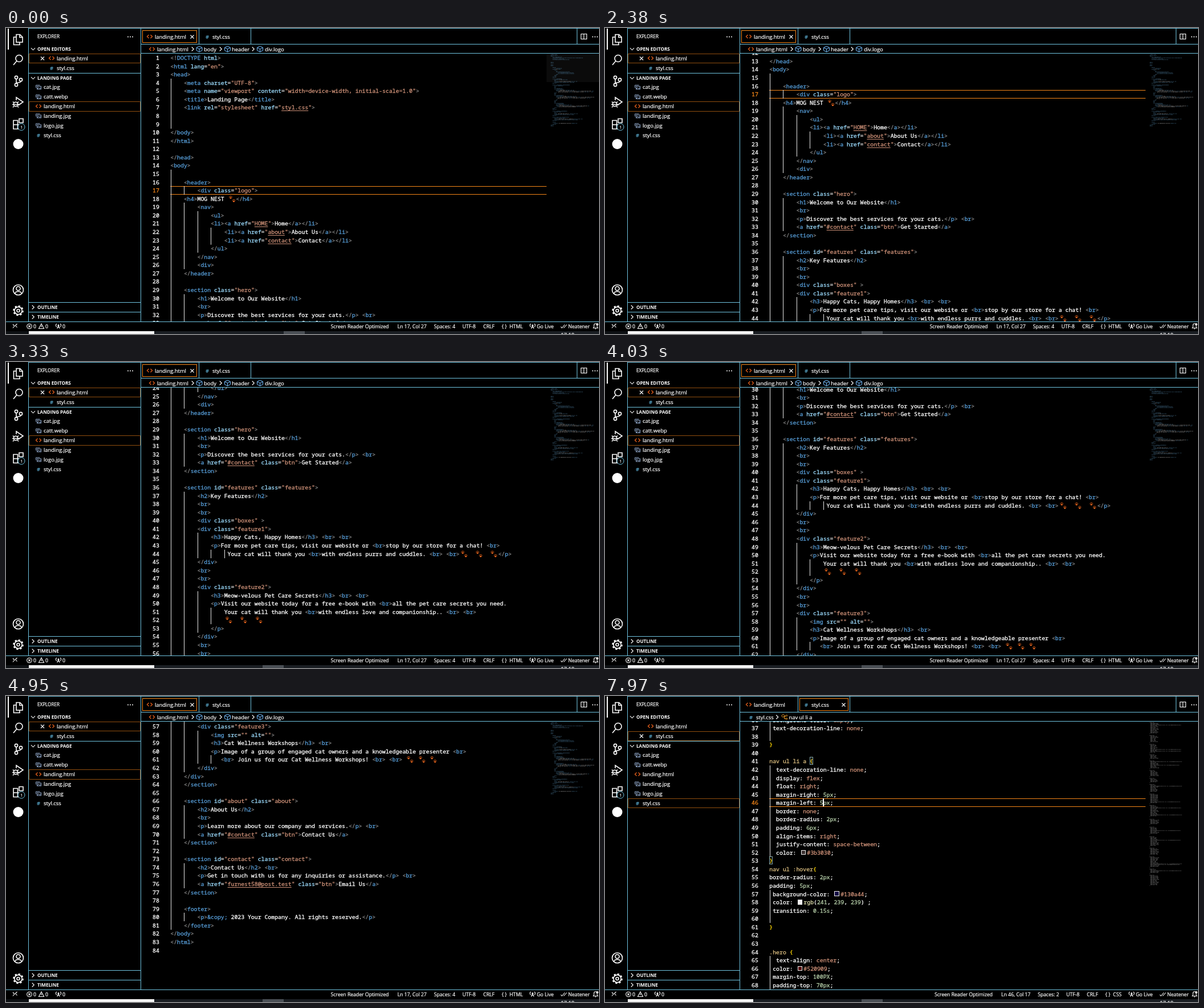
Write an HTML page with a canvas that moves like this. It is 1040 px wide and 538 px high and loops after 8 s.

```html
<!DOCTYPE html>
<html lang="en">
<head>
<meta charset="utf-8">
<title>Code editor</title>
<style>
html, body { margin: 0; width: 100%; height: 100%; overflow: hidden; background: #000; }
#stage { position: absolute; left: 0; top: 0; width: 1040px; height: 538px; overflow: hidden; background: #000; color: #fff; }
#stage > svg { position: absolute; left: 0; top: 0; }
text { font: 9.4px "Open Sans", "Noto Sans", sans-serif; fill: #fff; stroke: #fff; stroke-width: .22; white-space: pre; }
.cap { font-size: 8.1px; }
.head { font-size: 8.1px; font-weight: 700; stroke: none; }
.status text { font-size: 8.65px; }
.badge { font-size: 7px; }
.ico { fill: none; stroke: #fff; stroke-width: 1.1; }
.big { stroke-width: 1.6; }
.rule { fill: none; stroke: #6fc3df; stroke-width: 1; }
.focus { fill: none; stroke: #f38518; stroke-width: 1; }
.dim { stroke: #8f4d0e; }
.hash { fill: #519aba; stroke: none; font-weight: 700; }
.css-on, .hover-on { display: none; }
.css .css-on, .hover .hover-on { display: inline; }
.css .html-on { display: none; }

#editor { position: absolute; left: 237px; top: 45px; width: 711px; height: 471px; overflow: hidden;
  font: 9.84px/14.57px "Noto Sans Mono", "DejaVu Sans Mono", monospace; white-space: pre; -webkit-text-stroke: .32px currentColor; }
.pane { position: absolute; left: 0; top: 0; width: 711px; }
.row { position: absolute; left: 0; width: 711px; height: 14.57px; }
.row i { font-style: normal; }
.num { position: absolute; left: 0; width: 31.8px; text-align: right; }
.code { position: absolute; left: 51.3px; }
.guide { position: absolute; top: 0; width: 1px; height: 15px; background: #e8e8e8; }
.current::before { content: ""; position: absolute; left: 51px; right: 0; top: 0; height: 13px; border: solid #f38518; border-width: 1px 0; }
.current .num { color: #f38518; }
.pun { color: #808080; }
.tag { color: #569cd6; }
.att { color: #9cdcfe; }
.str { color: #ce9178; }
.link { text-decoration: underline; text-underline-offset: 2px; }
.sel { color: #d7ba7d; }
.brace { color: #ffd700; }
.match { outline: 1px solid #8aa; outline-offset: -1px; }
.val { color: #ce9178; }
.unit { color: #b5cea8; }
.fn { color: #dcdcaa; }
.chip { display: inline-block; box-sizing: border-box; width: 8.6px; height: 8.6px; margin: 0 2.15px; border: 1px solid #eee; vertical-align: -0.5px; }
.paw { width: 14.7px; height: 13px; vertical-align: -3px; }
#caret { position: absolute; left: 145px; width: 2px; height: 14px; background: #fff; }
canvas { position: absolute; left: 948px; top: 45px; }
#slider { position: absolute; left: 948px; width: 92px; height: 50px; background: rgba(255, 255, 255, .045); }
</style>
</head>
<body>
<div id="stage">
<svg width="1040" height="538" viewBox="0 0 1040 538">
  <defs>
    <path id="angle" d="M-1.5-3-4.5 0-1.5 3M1.5-3 4.5 0 1.5 3" fill="none" stroke="#e8601c" stroke-width="1.3"/>
    <path id="close" class="ico" d="M-3-3 3 3M3-3-3 3"/>
    <path id="down" class="ico" d="M-3.5-1.8 0 1.8 3.5-1.8"/>
    <path id="right" class="ico" d="M-1.8-3.5 1.8 0-1.8 3.5"/>
    <path id="cube" d="M0-5 5-2.5V2.5L0 5-5 2.5V-2.5ZM-5-2.5 0 0 5-2.5M0 0V5" fill="none" stroke="#75beff"/>
    <g id="pic" fill="none" stroke="#8fa6c8">
      <path d="M-4.5 1V-3.5H2.5"/><rect x="-2.5" y="-1.5" width="7" height="5"/><path d="M-2 3 0 .5 2 2.5 4 1"/>
    </g>
    <g id="dots" fill="#fff"><circle cx="-4" r="1"/><circle r="1"/><circle cx="4" r="1"/></g>
    <g id="mast" class="ico"><path d="M-2.3 4.5 0-1 2.3 4.5M-3.3-4A4 4 0 0 0-3.3 1.5M3.3-4A4 4 0 0 1 3.3 1.5M-1.5 2.5H1.5"/><circle cy="-1.3" r="1" fill="#fff"/></g>
    <g id="foot" fill="#e8651d">
      <ellipse cy="1.3" rx="1.8" ry="1.4"/><circle cx="-2.3" cy="-.4" r=".7"/><circle cx="-.9" cy="-1.8" r=".75"/><circle cx=".9" cy="-1.8" r=".75"/><circle cx="2.3" cy="-.4" r=".7"/>
    </g>
    <g id="paws"><use href="#foot" x="5" y="3.5"/><use href="#foot" x="10.5" y="9.5"/></g>
  </defs>

  <path class="rule" d="M40 .5H1040M39.5 0V516M236.5 0V516M40 79.5H236M40 482.5H236M40 499.5H236M0 516.5H1040M237 28.5H1040M237 44.5H1040M338.5 1V28M429.5 1V28M1001.5 1V28"/>

  <!-- activity bar -->
  <rect x="3" y="1" width="2" height="37" fill="#fff"/>
  <g class="ico big">
    <path d="M18 11.5h6.500l4.500 4.500v9h-11zM24 11.500v5h5M17.500 16h-4v13.500h10.500v-4"/>
    <circle cx="23" cy="53.500" r="6"/><path d="M18.800 58 13 65"/>
    <circle cx="18" cy="87" r="2.600"/><circle cx="18" cy="100" r="2.600"/><circle cx="26" cy="91" r="2.600"/><path d="M18 89.600v8M26 93.600c0 4-8 1-8 4"/>
    <path d="M18 127v-5l12 8-8.500 6"/><circle cx="17" cy="134" r="3.700"/><path d="M12 129.500l2 2M22 129.500l-2 2M11 134.500h12M12 139.500l2-2M22 139.500l-2-2"/>
    <path d="M13 162.500h7.500v15h-7.500zM13 170h15v7.500h-8M23 159.500h7v7h-7z"/>
    <circle cx="21.500" cy="460.500" r="9"/><circle cx="21.500" cy="458" r="3.500"/><path d="M15.500 467c1.500-5 10.500-5 12 0"/>
    <circle cx="21.500" cy="497" r="6.600"/><circle cx="21.500" cy="497" r="2.500"/>
    <circle cx="21.500" cy="497" r="8" stroke-width="2.600" stroke-dasharray="3.140 3.140"/>
  </g>
  <circle cx="27" cy="174" r="6" fill="#000" stroke="#6fc3df"/><text class="badge" x="25.200" y="176.600">1</text>
  <circle cx="21.500" cy="204" r="9" fill="#fff"/>

  <!-- side bar -->
  <text class="cap" x="55" y="18">EXPLORER</text><use href="#dots" x="218" y="15.500"/>
  <use href="#down" x="47.500" y="37"/><text class="head" x="55" y="40">OPEN EDITORS</text>
  <use href="#angle" x="80" y="53"/><text x="89" y="56.500">landing.html</text>
  <text class="hash" x="77" y="73.500">#</text><text x="89" y="73.500">styl.css</text>
  <use href="#down" x="47.500" y="88"/><text class="head" x="55" y="91">LANDING PAGE</text>
  <use href="#pic" x="57" y="104"/><text x="66" y="107">cat.jpg</text>
  <use href="#pic" x="57" y="121"/><text x="66" y="124">catt.webp</text>
  <use href="#angle" x="57" y="137.500"/><text x="66" y="141">landing.html</text>
  <use href="#pic" x="57" y="154.500"/><text x="66" y="158">landing.jpg</text>
  <use href="#pic" x="57" y="171.500"/><text x="66" y="174.500">logo.jpg</text>
  <text class="hash" x="54" y="191.500">#</text><text x="66" y="191.500">styl.css</text>
  <use href="#right" x="47.500" y="491"/><text class="head" x="55" y="494">OUTLINE</text>
  <use href="#right" x="47.500" y="508"/><text class="head" x="55" y="511">TIMELINE</text>
  <g class="html-on">
    <path class="focus dim" d="M40.500 45.500h195v16h-195zM40.500 129.500h195v17h-195z"/><use href="#close" x="64" y="53.500"/>
  </g>
  <g class="css-on">
    <path class="focus dim" d="M40.500 62.500h195v16h-195zM40.500 180.500h195v16h-195z"/><use href="#close" x="64" y="70.500"/>
  </g>

  <!-- tabs and breadcrumbs -->
  <use href="#angle" x="252" y="15"/><text x="261" y="19">landing.html</text>
  <text class="hash" x="350" y="19">#</text><text x="362" y="19">styl.css</text>
  <path class="ico" d="M1008.500 10.500h10v9h-10zM1013.500 10.500v9"/><use href="#dots" x="1033" y="15.500"/>
  <g class="html-on">
    <rect class="focus" x="239.500" y="4.500" width="95" height="21"/><use href="#close" x="326.500" y="15.500"/>
    <use href="#angle" x="256" y="37"/><text x="265" y="40.500">landing.html</text>
    <use href="#right" x="327.500" y="37"/><use href="#cube" x="339" y="37"/><text x="347" y="40.500">body</text>
    <use href="#right" x="376.500" y="37"/><use href="#cube" x="388.500" y="37"/><text x="396" y="40.500">header</text>
    <use href="#right" x="433.500" y="37"/><use href="#cube" x="445.500" y="37"/><text x="454" y="40.500">div.logo</text>
  </g>
  <g class="hover-on">
    <rect class="focus" x="341.500" y="4.500" width="85" height="21" stroke-dasharray="3 2"/><use href="#close" x="418.500" y="15.500"/>
  </g>
  <g class="css-on">
    <rect class="focus" x="341.500" y="4.500" width="85" height="21"/><use href="#close" x="418.500" y="15.500"/>
    <text class="hash" x="253" y="40.500">#</text><text x="265" y="40.500">styl.css</text><use href="#right" x="302" y="37"/>
    <path d="M309.500 35l3-3 2.500 2.500-3 3zM314 35.500h3M314.500 36v4h3M317 34.500l1.500-1.500 1.500 1.500-1.500 1.500zM317 40l1.500-1.500 1.500 1.500-1.500 1.500z" fill="none" stroke="#ee9d28"/>
    <text x="322.500" y="40.500">nav ul li a</text>
  </g>

  <!-- status bar -->
  <g class="status">
    <path class="ico" d="M12 521l3 3-3 3.500M19.500 520l-3 3 3 3.500"/>
    <circle class="ico" cx="41" cy="524.500" r="4.300"/><path class="ico" d="M39.200 522.700l3.600 3.600M42.800 522.700l-3.600 3.600"/><text x="48" y="527.700">0</text>
    <path class="ico" d="M62 520l4.500 8.500h-9zM62 523v3"/><text x="69" y="527.700">0</text>
    <use href="#mast" x="92" y="524"/><text x="99" y="527.700">0</text>
    <g class="html-on">
      <text x="569.500" y="527.700">Screen Reader Optimized</text><text x="686.500" y="527.700">Ln 17, Col 27</text><text x="750.500" y="527.700">Spaces: 4</text>
      <text x="800.500" y="527.700">UTF-8</text><text x="837" y="527.700">CRLF</text><text x="869.500" y="527.700">{ }</text><text x="883" y="527.700">HTML</text>
    </g>
    <g class="css-on">
      <text x="578" y="527.700">Screen Reader Optimized</text><text x="695" y="527.700">Ln 46, Col 17</text><text x="759" y="527.700">Spaces: 2</text>
      <text x="809" y="527.700">UTF-8</text><text x="845" y="527.700">CRLF</text><text x="877.500" y="527.700">{ }</text><text x="891" y="527.700">CSS</text>
    </g>
    <use href="#mast" x="923.500" y="524"/><text x="931" y="527.700">Go Live</text>
    <path class="ico" d="M973 525l2 2.500 5-6M978 527.500l5.500-6"/><text x="986" y="527.700">Neatener</text>
    <path class="ico" d="M1030 527.500h8l-1.200-2v-3a2.800 2.800 0 0 0-5.600 0v3zM1033 529h2"/><circle cx="1037" cy="521" r="2" fill="#fff"/>
  </g>
  <rect y="533" width="1040" height="5" fill="#1a1e23"/>
  <rect y="533" width="40" height="5" fill="#0d1013"/>
  <rect x="40" y="533" width="220" height="5" fill="#f3f3f3"/>
  <rect id="task" x="487" y="533" width="37" height="5" fill="#4a4f55"/>
  <text x="973" y="543">17:10</text>
</svg>

<div id="slider"></div>
<canvas id="miniHtml" class="html-on" width="92" height="300"></canvas>
<canvas id="miniCss" class="css-on" width="92" height="300"></canvas>
<div id="editor">
  <div id="htmlPane" class="pane html-on"></div>
  <div id="cssPane" class="pane css-on"></div>
  <div id="caret"></div>
</div>
<svg id="pointer" width="20" height="24" viewBox="0 0 20 24" fill="#fff" stroke="#000" stroke-width=".8">
  <path id="arrow" d="M1 1v14l3.300-3 2.300 5 2.200-1-2.300-4.700h4.500z"/>
  <path id="hand" d="M3.500 1.500c0-1.500 2.300-1.500 2.300 0v5.500c.5-1 2-.8 2.200.3.600-.8 2-.6 2.100.5.700-.6 2-.3 2 1v4.200c0 2-1.200 2.700-1.200 5h-6.400c0-2-2.800-4.500-4-7.500-.5-1.500 1.200-2 2-.8l1 1.300z"/>
</svg>
</div>

<script type="text/plain" id="htmlText">
<!DOCTYPE html>
<html lang="en">
<head>
    <meta charset="UTF-8">
    <meta name="viewport" content="width=device-width, initial-scale=1.0">
    <title>Landing Page</title>
    <link rel="stylesheet" href="styl.css">


</body>
</html>

</head>
<body>

    <header>
        <div class="logo">
    <h4>MOG NEST *</h4>
        <nav>
            <ul>
            <li><a href="HOME">Home</a></li>
                <li><a href="about">About Us</a></li>
                <li><a href="contact">Contact</a></li>
            </ul>
        </nav>
        <div>
    </header>

    <section class="hero">
        <h1>Welcome to Our Website</h1>
        <br>
        <p>Discover the best services for your cats.</p> <br>
        <a href="#contact" class="btn">Get Started</a>
    </section>

    <section id="features" class="features">
        <h2>Key Features</h2>
        <br>
        <br>
        <div class="boxes" >
        <div class="feature1">
            <h3>Happy Cats, Happy Homes</h3> <br> <br>
            <p>For more pet care tips, visit our website or <br>stop by our store for a chat! <br>
                 Your cat will thank you <br>with endless purrs and cuddles. <br> <br>*  *  *</p>
        </div>
        <br>
        <br>
        <div class="feature2">
            <h3>Meow-velous Pet Care Secrets</h3> <br> <br>
            <p>Visit our website today for a free e-book with <br>all the pet care secrets you need.
                Your cat will thank you <br>with endless love and companionship.. <br> <br>
                *  *  *
            </p>
        </div>
        <br>
        <br>
        <div class="feature3">
            <img src="" alt="">
            <h3>Cat Wellness Workshops</h3> <br>
            <p>Image of a group of engaged cat owners and a knowledgeable presenter <br>
               <br> Join us for our Cat Wellness Workshops! <br> <br> * * *
        </div>
    </div>
    </section>

    <section id="about" class="about">
        <h2>About Us</h2>
        <br>
        <p>Learn more about our company and services.</p> <br>
        <a href="#contact" class="btn">Contact Us</a>
    </section>

    <section id="contact" class="contact">
        <h2>Contact Us</h2> <br>
        <p>Get in touch with us for any inquiries or assistance.</p> <br>
        <a href="furnest58@post.test" class="btn">Email Us</a>
    </section>

    <footer>
        <p>&copy; 2023 Your Company. All rights reserved.</p>
    </footer>
</body>
</html>

</script>
<script type="text/plain" id="cssText">
 background-color: empty;
 text-decoration-line: none;

}

nav ul li a {
  text-decoration-line: none;
  display: flex;
  float: right;
  margin-right: 5px;
  margin-left: 5px;
  border: none;
  border-radius: 2px;
  padding: 6px;
  align-items: right;
  justify-content: space-between;
  color: #3b3030;
}
nav ul :hover{
border-radius: 2px;
padding: 5px;
 background-color: #130a44;
 color: rgb(241, 239, 239) ;
 transition: 0.15s;

}


.hero {
  text-align: center;
 color: #520909;
 margin-top: 100PX;
 padding-top: 70px;
</script>
<script>
const LOOP = 8000, LINE = 14.573, CHAR = 5.904;
const $ = id => document.getElementById(id);
const readLines = id => $(id).textContent.slice(1, -1).split("\n");
const esc = s => s.replace(/&/g, "&amp;").replace(/</g, "&lt;");
const tok = (cls, s) => `<i class="${cls}">${esc(s)}</i>`;
const paw = '<svg class="paw" viewBox="0 0 14.7 13"><use href="#paws"/></svg>';

const attrs = s => s.replace(/([\w-]+)(?:="([^"]*)")?/g, (m, name, value) => {
  if (value === undefined) return tok("att", name);
  const cls = name === "href" ? "str link" : "str";
  return tok("att", name) + "=" + tok("str", '"') + tok(cls, value) + tok("str", '"');
});

const paintHtml = line => line.replace(/<(!?\/?)(\w+)([^>]*)>|&\w+;|\*|[^<&*]+/g, (m, mark, name, rest) => {
  if (m === "*") return paw;
  if (m[0] === "&") return tok("tag", m);
  if (!name) return esc(m);
  return tok("pun", "<" + mark) + tok("tag", name) + attrs(rest) + tok("pun", ">");
});

const chip = color => `<b class="chip" style="background:${color}"></b>`;
const paintValue = s => s.replace(/#\w{6}|rgb\([^)]*\)|\d[\w.]*|[a-z-]+/g, m => {
  if (m[0] === "#") return chip(m) + tok("val", m);
  if (m.startsWith("rgb")) return chip(m) + tok("fn", "rgb") + m.slice(3).replace(/\d+/g, n => tok("unit", n));
  return tok(/^\d/.test(m) ? "unit" : "val", m);
});

function paintCss(line, n) {
  const brace = n === 41 || n === 53 ? "brace match" : "brace";
  if (/[{}]$/.test(line)) return tok("sel", line.slice(0, -1)) + tok(brace, line.slice(-1));
  const cut = line.indexOf(":") + 1;
  return esc(line.slice(0, cut)) + paintValue(line.slice(cut));
}

function guideCount(lines, i, tab) {
  const depth = k => (lines[k] ? lines[k].search(/\S/) / tab : 0);
  if (lines[i]) return Math.ceil(depth(i));
  let a = i, b = i;
  while (a > 0 && !lines[a]) a--;
  while (b < lines.length && !lines[b]) b++;
  const up = depth(a), low = depth(b);
  return up === low ? Math.ceil(up) : 1 + Math.floor(Math.min(up, low));
}

function buildPane(id, lines, first, current, tab, paint) {
  $(id).innerHTML = lines.map((line, i) => {
    const n = first + i;
    let guides = "";
    for (let g = 0; g < guideCount(lines, i, tab); g++)
      guides += `<i class="guide" style="left:${51.5 + g * tab * CHAR}px"></i>`;
    return `<div class="row${n === current ? " current" : ""}" style="top:${(n - 1) * LINE}px">` +
      `<span class="num">${n}</span>${guides}<span class="code">${paint(line, n)}</span></div>`;
  }).join("");
}

function drawMini(id, lines, tint) {
  const ctx = $(id).getContext("2d");
  lines.forEach((line, row) => {
    for (const word of line.matchAll(/\S+/g)) {
      ctx.fillStyle = tint(word[0]);
      for (let k = 0; k < word[0].length; k++) {
        ctx.globalAlpha = 0.2 + (word[0].charCodeAt(k) * 7 % 10) / 20;
        ctx.fillRect(7 + (word.index + k) * 0.77, 1 + row * 1.534, 0.7, 1);
      }
    }
  });
}

// Rules of random length stand in for the whole style sheet.
function sheetLines() {
  let seed = 11;
  const rnd = n => (seed = seed * 16807 % 2147483647) % n;
  const out = [];
  while (out.length < 186) {
    out.push("section ul {");
    for (let k = 4 + rnd(9); k > 0; k--)
      out.push("  " + "margin-left:".slice(0, 6 + rnd(7)) + " " + (rnd(9) ? "center;".slice(rnd(4)) : "rgba(0, 0, 0, 0.25) 0px 54px 55px, rgba(0, 0, 0, 0.12) 0px;"));
    out.push("}", "");
    if (!rnd(3)) out.push("");
  }
  return out.slice(0, 188);
}

const htmlLines = readLines("htmlText");
buildPane("htmlPane", htmlLines, 1, 17, 4, paintHtml);
buildPane("cssPane", readLines("cssText"), 36, 46, 2, paintCss);
drawMini("miniHtml", htmlLines, w => /[<>="]/.test(w) ? "#5a8db0" : "#ddd");
drawMini("miniCss", sheetLines(), () => "#bbb");

// start, end, steps, resting offset
const swipes = [[1930, 2530, 9, 199.2], [2890, 3560, 9, 396.7], [4030, 4410, 6, 714.2], [4790, 5260, 7, 965]];
function scrollAt(t) {
  let y = 0;
  for (const [start, end, steps, to] of swipes) {
    if (t < start) break;
    const p = Math.min(steps, Math.floor((t - start) / (end - start) * (steps - 1) + 1.01)) / steps;
    y += (to - y) * (0.24 * p + 0.76 * p * p * (3 - 2 * p));
  }
  return y;
}

// time, shape, x, y
const moves = [
  [0], [5810, "arrow", 1027, 216], [5890], [5960, "hand", 403, 2], [6190, "hand", 397, 6],
  [6270, "hand", 392, 7], [6340, "hand", 387, 7], [6420, "hand", 383, 7],
  [6680, "hand", 380, 7], [6810, "hand", 376, 7], [7060]
];
const show = (id, on) => { $(id).style.display = on ? "" : "none"; };
const CSS_AT = 6980, CSS_TOP = 520.5;
$("cssPane").style.top = -CSS_TOP + "px";
$("caret").style.top = 45 * LINE - CSS_TOP + "px";

function render(t) {
  const css = t >= CSS_AT;
  $("stage").className = css ? "css" : t >= 6190 ? "hover" : "";
  $("htmlPane").style.transform = `translateY(${-Math.round(scrollAt(t))}px)`;
  $("task").setAttribute("x", t < 1930 ? 487 : 450);
  show("caret", css && (t < 7470 || t >= 7970));
  show("slider", t < 70 || (t >= 7650 && t < 7800));
  $("slider").style.top = (css ? 96 : 45) + "px";

  const [, shape, x, y] = moves.filter(m => m[0] <= t).pop();
  show("pointer", shape);
  show("arrow", shape === "arrow");
  show("hand", shape === "hand");
  if (shape) $("pointer").style.transform = `translate(${x}px, ${y}px)`;
}

const begin = performance.now();
function tick() {
  render((performance.now() - begin) % LOOP);
  requestAnimationFrame(tick);
}
tick();
</script>
</body>
</html>
```
